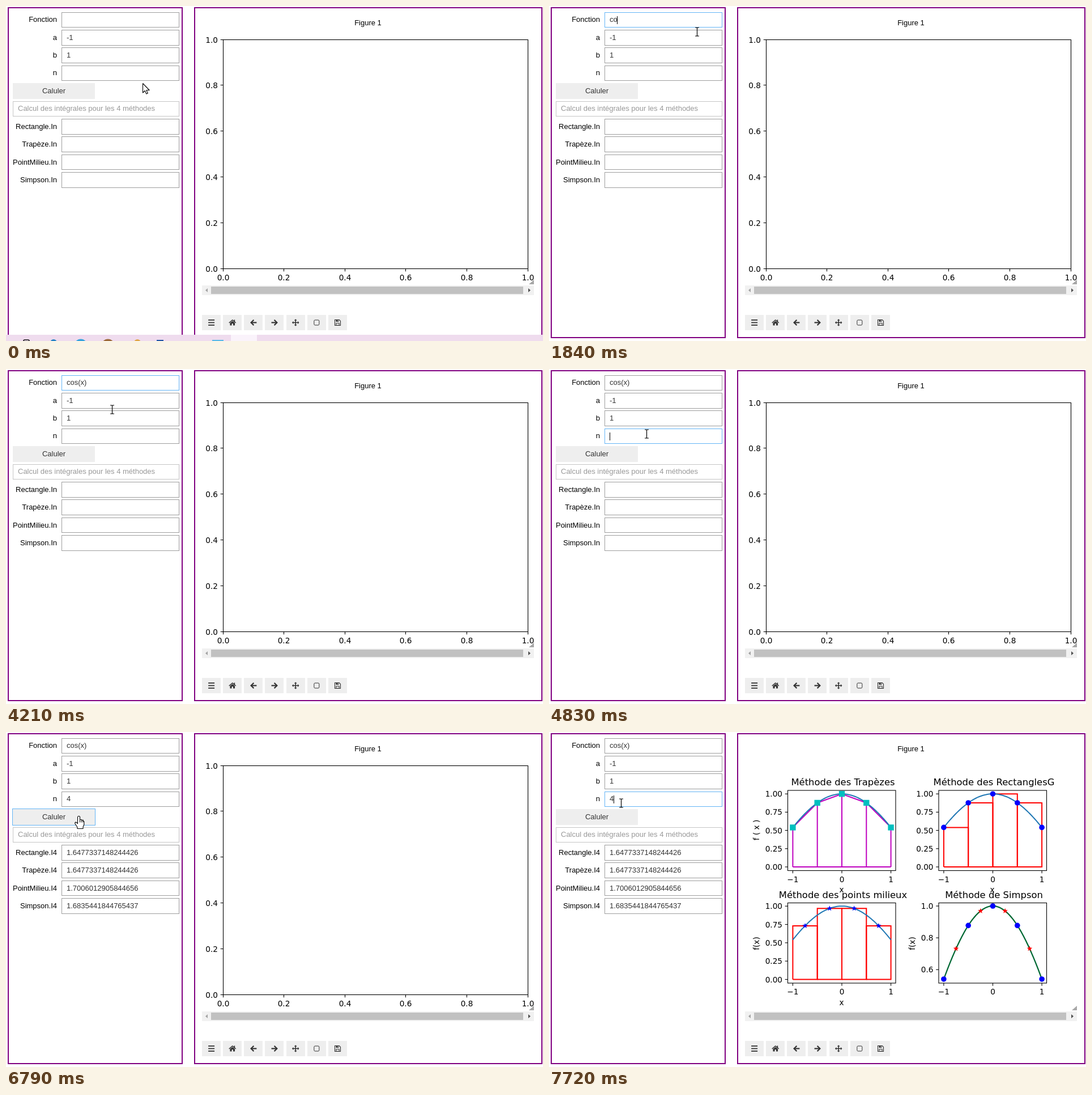
An HTML page with a canvas for the animation above (8 s loop, 948 px wide and 591 px high).

```html
<!DOCTYPE html>
<html lang="fr">
<head>
<meta charset="utf-8">
<title>Calcul des intégrales</title>
<style>
html, body { margin: 0; width: 100%; height: 100%; overflow: hidden; background: #fff; }
canvas { display: block; }
</style>
</head>
<body>
<canvas id="stage" width="948" height="591"></canvas>
<script>
const ctx = document.getElementById('stage').getContext('2d');
const LOOP = 8000;
const UI = '13px "Liberation Sans", Arial, sans-serif';
const PLOT = '13.65px "DejaVu Sans", sans-serif';
const TITLE = '16.4px "DejaVu Sans", sans-serif';
const INK = '#333', FOCUS = '#64b5f6';

// time, x, y, shape: each pose holds until the next one
const pointer = [
  [0, 241, 136, 'arrow'], [70, 233, 112, 'beam'], [120, 222, 84, 'beam'],
  [170, 212, 58, 'beam'], [220, 208, 43, 'beam'], [520, 206, 40, 'beam'],
  [600, 205, 38, 'beam'], [750, 202, 34, 'beam'], [830, 199, 30, 'beam'],
  [900, 199, 31, 'beam'], [1210, 232, 39, 'beam'], [1290, 261, 45, 'beam'],
  [3970, 250, 48, 'beam'], [4050, 226, 56, 'beam'], [4130, 203, 65, 'beam'],
  [4210, 187, 71, 'beam'], [4290, 183, 79, 'beam'], [4370, 182, 88, 'beam'],
  [4450, 184, 96, 'beam'], [4530, 187, 103, 'beam'], [4600, 188, 106, 'beam'],
  [4830, 172, 114, 'beam'], [5920, 165, 125, 'beam'], [6010, 150, 139, 'hand'],
  [6090, 136, 146, 'hand'], [6170, 128, 148, 'hand'], [7250, 128, 143, 'hand'],
  [7330, 127, 133, 'beam'], [7400, 127, 128, 'beam'], [7480, 127, 125, 'beam']
];
const typing = [[0, ''], [1610, 'c'], [1840, 'co'], [2020, 'cos'], [2420, 'cos('], [3280, 'cos(x)']];
const focus = [[0, ''], [450, 'a'], [980, 'Fonction'], [4750, 'n'], [6380, 'button'], [7650, 'n']];
const caret = [[0, 0], [450, 1], [1440, 0], [1610, 1], [2980, 0], [3280, 1], [3740, 0],
  [4250, 1], [5290, 0], [5840, 1]];
const results = [
  ['Rectangle', '1.6477337148244426', 6700], ['Trapèze', '1.6477337148244426', 6700],
  ['PointMilieu', '1.7006012905844656', 6790], ['Simpson', '1.6835441844765437', 6790]
];

const at = (keys, t) => keys.filter(k => k[0] <= t).pop();
const rowY = i => 11.1 + 31.4 * i;

function rect(x, y, w, h, color) {
  ctx.fillStyle = color;
  ctx.fillRect(x, y, w, h);
}
function frame(x, y, w, h, color, lw = 1) {
  ctx.strokeStyle = color;
  ctx.lineWidth = lw;
  ctx.strokeRect(x + lw / 2, y + lw / 2, w - lw, h - lw);
}
function text(s, x, y, font, color = '#000', align = 'left') {
  ctx.font = font;
  ctx.fillStyle = color;
  ctx.textAlign = align;
  ctx.fillText(s, x, y);
}
function trace(pts, close) {
  ctx.beginPath();
  pts.forEach(([x, y]) => ctx.lineTo(x, y));
  if (close) ctx.closePath();
}
function line(pts, color, lw) {
  trace(pts);
  ctx.strokeStyle = color;
  ctx.lineWidth = lw;
  ctx.stroke();
}
function shape(pts, color) {
  trace(pts, true);
  ctx.fillStyle = color;
  ctx.fill();
}
function dot(x, y, r, color) {
  ctx.beginPath();
  ctx.arc(x, y, r, 0, 2 * Math.PI);
  ctx.fillStyle = color;
  ctx.fill();
}

// ---- form ----
function box(i, x, border) {
  const y = Math.floor(rowY(i));
  frame(x, y, 306 - x, Math.floor(rowY(i) + 27.6) - y, border);
}
function field(i, label, value, focused, caretOn) {
  const base = Math.round(rowY(i) + 17.2);
  text(label, 90, base, UI, '#000', 'right');
  box(i, 98, focused ? FOCUS : '#9e9e9e');
  text(value, 107, base, UI, INK);
  if (focused && caretOn)
    rect(Math.floor(107 + ctx.measureText(value).width), Math.floor(rowY(i)) + 7, 1, 14, '#000');
}
function button(t, focused) {
  const hover = t >= 6010 && t < 6380, down = t >= 6380 && t < 6550;
  ctx.save();
  if (hover) {
    ctx.shadowColor = 'rgba(0,0,0,.4)';
    ctx.shadowBlur = 3;
    ctx.shadowOffsetY = 1.5;
  }
  rect(12, 136, 145, 28, down ? '#bdbdbd' : '#eee');
  ctx.restore();
  if (focused) frame(11, 135, 147, 30, FOCUS);
  text('Caluler', 84.5, 154, UI, INK, 'center');
}
function form(t) {
  const who = at(focus, t)[1], on = at(caret, t)[1];
  const values = { Fonction: at(typing, t)[1], a: '-1', b: '1', n: t >= 5840 ? '4' : '' };
  Object.keys(values).forEach((k, i) => field(i, k, values[k], who === k, on));
  box(5, 12, '#c5c5c5');
  text('Calcul des intégrales pour les 4 méthodes', 21, 185, UI, '#999');
  results.forEach(([name, value, from], i) => {
    const done = t >= from;
    field(i + 6, name + (done ? '.I4' : '.In'), done ? value : '');
  });
  button(t, who === 'button');
}

// ---- figure ----
function axes(x, y, w, h, xt, yt) {
  const lw = 1.1;
  for (const [px, label] of xt) {
    line([[px, y + h], [px, y + h + 4.8]], '#000', lw);
    text(label, px, y + h + 20, PLOT, '#000', 'center');
  }
  for (const [py, label] of yt) {
    line([[x - 4.8, py], [x, py]], '#000', lw);
    text(label, x - 9.5, py + 5, PLOT, '#000', 'right');
  }
  ctx.strokeStyle = '#000';
  ctx.lineWidth = lw;
  ctx.strokeRect(x, y, w, h);
}
function emptyPlot() {
  const ticks = [0, .2, .4, .6, .8, 1];
  axes(383.5, 59.5, 538, 404,
    ticks.map(v => [Math.floor(383 + 538 * v) + .5, v.toFixed(1)]),
    ticks.map(v => [Math.floor(463 - 404 * v) + .5, v.toFixed(1)]));
}
function star(x, y, color) {
  const pts = Array.from({ length: 10 }, (_, i) => {
    const r = i % 2 ? 2.1 : 5, a = Math.PI * (i / 5 - .5);
    return [x + r * Math.cos(a), y + r * Math.sin(a)];
  });
  shape(pts, color);
}
function sideways(s, x, y) {
  ctx.save();
  ctx.translate(x, y);
  ctx.rotate(-Math.PI / 2);
  text(s, 0, 0, PLOT, '#000', 'center');
  ctx.restore();
}
function panel(x, y, title, ticks, zero, unit, draw) {
  const X = v => x + 95.5 + 86.6 * v, Y = v => zero - unit * v;
  const pts = vs => vs.map(v => [X(v), Y(Math.cos(v))]);
  draw({
    X, Y, pts,
    curve(color) {
      line(pts(Array.from({ length: 81 }, (_, i) => i / 40 - 1)), color, 2);
    },
    bars(height) {
      for (let v = -1; v < 1; v += .5) {
        const h = Y(height(v));
        line([[X(v), Y(0)], [X(v), h], [X(v + .5), h], [X(v + .5), Y(0)], [X(v), Y(0)]], '#f00', 2);
      }
    }
  });
  axes(x, y, 190.5, 141.5,
    [-1, 0, 1].map(v => [X(v), v < 0 ? '−1' : String(v)]),
    ticks.map(v => [Y(v), v.toFixed(ticks.length > 3 ? 2 : 1)]));
  text(title, x + 97.5, y - 9, TITLE, '#000', 'center');
}
function methods() {
  const nodes = [-1, -.5, 0, .5, 1], mids = [-.75, -.25, .25, .75];
  const quarters = [0, .25, .5, .75, 1];
  const SKY = '#1f77b4', MAG = '#bf00bf', BLUE = '#00f';

  panel(421.5, 103, 'Méthode des Trapèzes', quarters, 238, 128.8, p => {
    const top = p.pts(nodes);
    line([[p.X(-1), p.Y(0)], [p.X(1), p.Y(0)]], MAG, 2);
    top.forEach(([x, y]) => line([[x, p.Y(0)], [x, y]], MAG, 2));
    line(top, MAG, 2);
    p.curve(SKY);
    top.forEach(([x, y]) => rect(x - 5.2, y - 5.2, 10.4, 10.4, '#00bfbf'));
  });
  panel(688, 103, 'Méthode des RectanglesG', quarters, 238, 128.8, p => {
    p.bars(Math.cos);
    p.curve(SKY);
    p.pts(nodes).forEach(([x, y]) => dot(x, y, 4.8, BLUE));
  });
  text('x', 516.5, 283, PLOT, '#000', 'center');
  text('x', 782.5, 283, PLOT, '#000', 'center');
  panel(421.5, 301.5, 'Méthode des points milieux', quarters, 436.5, 129.3, p => {
    p.bars(v => Math.cos(v + .25));
    p.curve(SKY);
    p.pts(mids).forEach(([x, y]) => star(x, y, BLUE));
  });
  panel(688, 301.5, 'Méthode de Simpson', [.6, .8, 1], 587.5, 280.5, p => {
    p.curve(SKY);
    p.curve('#0a6e2c');
    p.pts(nodes).forEach(([x, y]) => dot(x, y, 4.8, BLUE));
    p.pts(mids).forEach(([x, y]) => star(x, y, '#f00'));
  });
  text('x', 516.5, 482, PLOT, '#000', 'center');
  sideways('f ( x )', 371, 173);
  sideways('f(x)', 371, 373);
  sideways('f(x)', 646, 373);
}

function scrollbar() {
  shape([[932, 483], [932, 491], [923, 491]], '#a8a8a8');
  rect(346, 493, 586, 17, '#f1f1f1');
  rect(362, 495, 551, 13, '#c1c1c1');
  shape([[356, 498], [356, 505], [352, 501.5]], '#a3a3a3');
  shape([[922, 498], [922, 505], [926, 501.5]], '#505050');
}

// ---- toolbar ----
function arrowIcon() {
  line([[-4.5, 0], [5.5, 0]], INK, 2.2);
  line([[.5, -4.8], [-4.3, 0], [.5, 4.8]], INK, 2.2);
}
const icons = [
  () => [-4.5, 0, 4.5].forEach(y => rect(-5.5, y - .9, 11, 1.8, INK)),
  () => {
    line([[-6, .5], [0, -4.6], [6, .5]], INK, 1.5);
    rect(2.6, -5, 1.8, 4, INK);
    shape([[-4.3, .8], [0, -2.8], [4.3, .8], [4.3, 5], [1.2, 5], [1.2, 1.8], [-1.2, 1.8], [-1.2, 5], [-4.3, 5]], INK);
  },
  arrowIcon,
  () => { ctx.scale(-1, 1); arrowIcon(); },
  () => {
    for (let i = 0; i < 4; i++) {
      ctx.rotate(Math.PI / 2);
      rect(0, -.8, 5, 1.6, INK);
      shape([[3.8, -2.5], [6.3, 0], [3.8, 2.5]], INK);
    }
  },
  () => {
    ctx.beginPath();
    ctx.roundRect(-4.5, -4.5, 9, 9, 1.8);
    ctx.strokeStyle = INK;
    ctx.lineWidth = 1;
    ctx.stroke();
  },
  () => {
    trace([[-5, -5], [2.8, -5], [5, -2.8], [5, 5], [-5, 5]], true);
    ctx.strokeStyle = INK;
    ctx.lineWidth = 1.1;
    ctx.stroke();
    frame(-3.2, .6, 6.4, 4.6, INK);
    rect(-3, -5, 5, 3.6, INK);
    rect(0, -4.4, 1.1, 2.2, '#eee');
  }
];
function toolbar() {
  icons.forEach((draw, i) => {
    const x = 346 + 37.15 * i;
    rect(Math.round(x), 545, 33, 27, '#eee');
    ctx.save();
    ctx.translate(x + 16.6, 558.5);
    draw();
    ctx.restore();
  });
}

function taskbar(t) {
  if (t >= 600) return;
  const y = t < 520 ? 580 : 586;
  rect(0, y, 948, 11, '#efdcee');
  rect(397, y, 46, 11, '#faf3fb');
  ctx.beginPath();
  ctx.roundRect(31, y + 9, 10, 12, 2);
  ctx.strokeStyle = '#111';
  ctx.lineWidth = 1.6;
  ctx.stroke();
  dot(84, y + 14, 6, '#2483c5');
  dot(132, y + 19, 11.5, '#35a3dd');
  dot(180, y + 19, 11.5, '#9c6a3a');
  dot(232, y + 14, 6, '#dfa548');
  rect(266, y + 9, 12, 10, '#1f55a5');
  rect(364, y + 9, 20, 10, '#58b9e8');
}

// ---- pointer ----
const ARROW = [[0, 0], [0, 16.5], [3.8, 13], [6.3, 18.6], [8.8, 17.5], [6.4, 12], [11.6, 12]];
const HAND = [[-2, 1.2], [-1, 0], [1, 0], [2, 1.2], [2, 6], [4.5, 6], [5, 7], [7.2, 7.2], [7.8, 8.5],
  [9.3, 9.2], [9.3, 15], [7.5, 19], [7.5, 22], [-2.5, 22], [-2.5, 19.5], [-6.7, 13], [-6.5, 11],
  [-4.8, 10.6], [-2, 13]];
function cursor(t) {
  const [, x, y, kind] = at(pointer, t);
  ctx.save();
  ctx.translate(x + .5, y + .5);
  if (kind === 'beam') {
    line([[0, -7], [0, 7]], '#000', 1.2);
    for (const e of [-7.5, 7.5]) line([[-3.5, e], [-.8, e], [0, e * .9], [.8, e], [3.5, e]], '#000', 1.1);
  } else {
    const pts = kind === 'hand' ? HAND : ARROW;
    shape(pts, '#fff');
    ctx.lineJoin = 'round';
    line([...pts, pts[0]], '#000', 1.1);
    if (kind === 'hand')
      [2, 4.8, 7.4].forEach(f => line([[f, 6], [f, 11]], '#000', 1));
  }
  ctx.restore();
}

function draw(t) {
  rect(0, 0, 948, 591, '#fff');
  frame(3, 2, 309, 584, '#800080', 2);
  frame(332, 2, 615, 584, '#800080', 2);
  form(t);
  text('Figure 1', 639, 34, UI, '#000', 'center');
  if (t < 7020) emptyPlot();
  else methods();
  scrollbar();
  toolbar();
  taskbar(t);
  cursor(t);
}
function tick() {
  draw(performance.now() % LOOP);
  requestAnimationFrame(tick);
}
tick();
</script>
</body>
</html>
```
